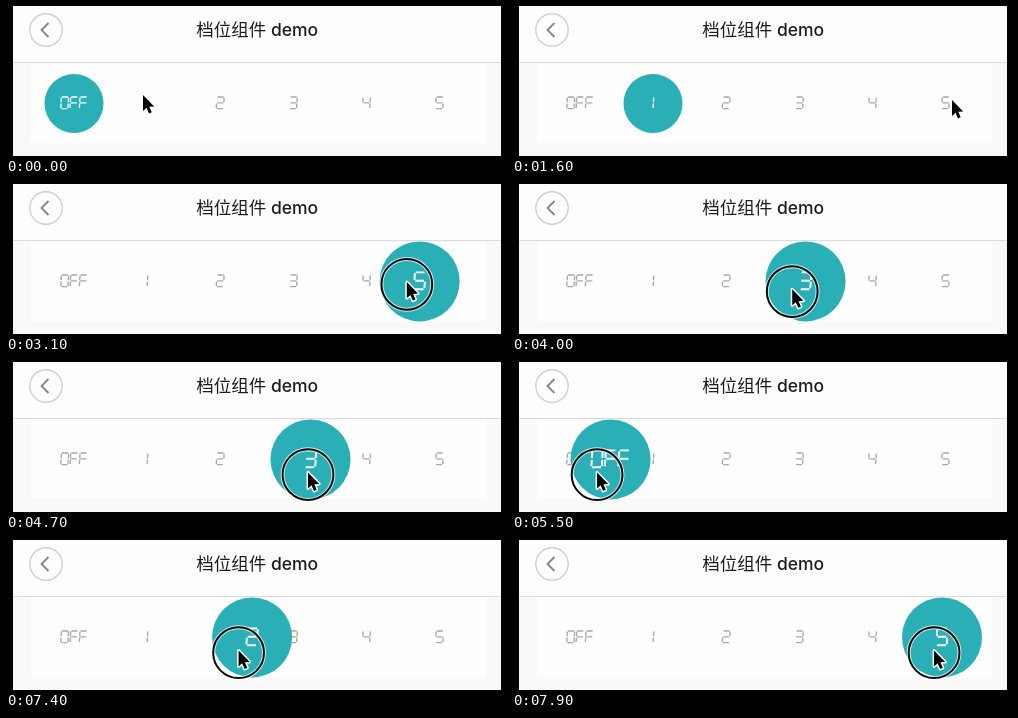
Animation, 500 px wide and 150 px high, one loop 8000 ms. Source, as an HTML page with a canvas:

```html
<!DOCTYPE html>
<html lang="zh">
<head>
<meta charset="utf-8">
<style>
  html, body { margin: 0; width: 100%; height: 100%; overflow: hidden; }
  canvas { display: block; width: 500px; height: 150px; }
</style>
</head>
<body>
<canvas></canvas>
<script>
const LOOP = 8000, STEP = 100;
const MID_Y = 97.4;
const canvas = document.querySelector('canvas');
const ctx = canvas.getContext('2d');
const ratio = window.devicePixelRatio || 1;
canvas.width = 500 * ratio;
canvas.height = 150 * ratio;
ctx.scale(ratio, ratio);

const labels = ['OFF', '1', '2', '3', '4', '5'];
const FIRST_X = 68, GAP = 73.1;

// Turning points of each movement, as [time, position]
const knobTurns = [
  [400, 68], [1000, 144], [1200, 141], [1700, 141], [1900, 430],
  [2400, 216], [2900, 428], [3700, 330], [4500, 212], [4900, 397],
  [5600, 83], [6200, 83], [6700, 130], [7100, 439], [7500, 213], [7900, 430]
];
const hoverTurns = [[100, 137], [400, 60], [1000, 136], [1600, 440], [1900, 422]];
const heightTurns = [[100, 89], [1000, 106], [1600, 94], [2400, 114], [3000, 98], [4800, 110.5]];
const presses = [[400, 1000], [1800, LOOP]];

const clamp = (v, lo = 0, hi = 1) => Math.min(hi, Math.max(lo, v));

// Cosine swing from one turning point to the next
function swing(turns, t) {
  const next = turns.findIndex(turn => turn[0] > t);
  if (next === 0) return turns[0][1];
  if (next < 0) return turns[turns.length - 1][1];
  const [t0, x0] = turns[next - 1], [t1, x1] = turns[next];
  return x0 + (x1 - x0) * (1 - Math.cos(Math.PI * (t - t0) / (t1 - t0))) / 2;
}

const knobX = t => swing(knobTurns, t);
const isPressed = t => presses.some(([start, end]) => t > start && t <= end);
const growth = t => Math.max(...presses.map(([start, end]) =>
  clamp(Math.min((t - start) / 100, 1 - (t - end) / 200))));

// A held pointer runs slightly ahead of the knob it drags
function pointerX(t) {
  if (!isPressed(t) || t < 1900) {
    if (!isPressed(t) || t > 1000) return swing(hoverTurns, t);
  }
  const speed = (knobX(t + 1) - knobX(t - 1)) / 2;
  return knobX(t) - 8 + 5.5 * Math.tanh(10 * speed);
}

function disc(x, y, r) {
  ctx.beginPath();
  ctx.arc(x, y, r, 0, 2 * Math.PI);
}

function polyline(points) {
  ctx.beginPath();
  points.forEach(([x, y]) => ctx.lineTo(x, y));
}

function stroke(color, width) {
  ctx.strokeStyle = color;
  ctx.lineWidth = width;
  ctx.stroke();
}

// Seven-segment lettering: horizontals a, g, d and verticals f, b, e, c
const glyphs = {
  O: 'abcdef', F: 'aefg', 1: 'bc', 2: 'abged', 3: 'abgcd', 4: 'fgbc', 5: 'afgcd'
};

function addSegment(name, x) {
  const level = 'agd'.indexOf(name);
  if (level >= 0) {
    const y = (level - 1) * 5.8;
    ctx.moveTo(x - 3, y);
    ctx.lineTo(x + 3, y);
  } else {
    const side = 'bc'.includes(name) ? 3.6 : -3.6;
    const half = 'bf'.includes(name) ? -1 : 1;
    ctx.moveTo(x + side, half * 0.6);
    ctx.lineTo(x + side, half * 5.2);
  }
}

function drawLabel(text, x, scale, color) {
  ctx.save();
  ctx.translate(x, 96.8);
  ctx.transform(scale, 0, -0.06 * scale, scale, 0, 0);
  ctx.beginPath();
  [...text].forEach((char, i) => {
    const shift = (i - (text.length - 1) / 2) * 9.3 - (char === '1' ? 3.2 : 0);
    for (const name of glyphs[char]) addSegment(name, shift);
  });
  stroke(color, 1.35);
  ctx.restore();
}

function drawPage() {
  const box = (color, x, y, w, h) => {
    ctx.fillStyle = color;
    ctx.fillRect(x, y, w, h);
  };
  box('#000', 0, 0, 500, 150);
  box('#f9f9f9', 7, 0, 488, 150);
  box('#fefefe', 7, 0, 488, 56);
  box('#dcdcdc', 7, 56, 488, 1);
  box('#fefefe', 25, 58, 455, 79);

  disc(40, 24, 16.2);
  stroke('#cfcfcf', 1.4);
  polyline([[42.5, 17], [35.5, 24], [42.5, 31]]);
  stroke('#858585', 1.8);

  ctx.fillStyle = '#1c1c1c';
  ctx.font = '500 17.5px Inter, "Noto Sans CJK SC", "Noto Sans CJK", sans-serif';
  ctx.textAlign = 'center';
  ctx.fillText('档位组件 demo', 251.2, 30.2);
  labels.forEach((text, i) => drawLabel(text, FIRST_X + GAP * i, 1, '#a8a8a8'));
}

function drawKnob(t) {
  const x = knobX(t), grow = growth(t);
  disc(x, MID_Y, 29.5 + 10.5 * grow);
  ctx.fillStyle = '#2aafb6';
  ctx.fill();
  const nearest = clamp(Math.round((x - FIRST_X) / GAP), 0, 5);
  drawLabel(labels[nearest], x, 1 + 0.45 * grow, '#fff');
}

function drawPointer(t) {
  const x = pointerX(t), y = swing(heightTurns, t);
  if (isPressed(t)) {
    disc(x, y + 2.2, 25.4);
    stroke('rgba(255,255,255,.75)', 4);
    stroke('#0a0a0a', 2);
  }
  ctx.save();
  ctx.translate(x, y);
  polyline([[0, 0], [0, 16], [3.6, 12.8], [6, 18.5], [8.7, 17.3], [6.3, 11.8], [11.2, 11.5]]);
  ctx.closePath();
  ctx.lineJoin = 'round';
  stroke('#fff', 3);
  ctx.fillStyle = '#000';
  ctx.fill();
  ctx.restore();
}

function render() {
  const t = Math.floor(performance.now() % LOOP / STEP) * STEP;
  drawPage();
  drawKnob(t);
  drawPointer(t);
  requestAnimationFrame(render);
}
render();
</script>
</body>
</html>
```
